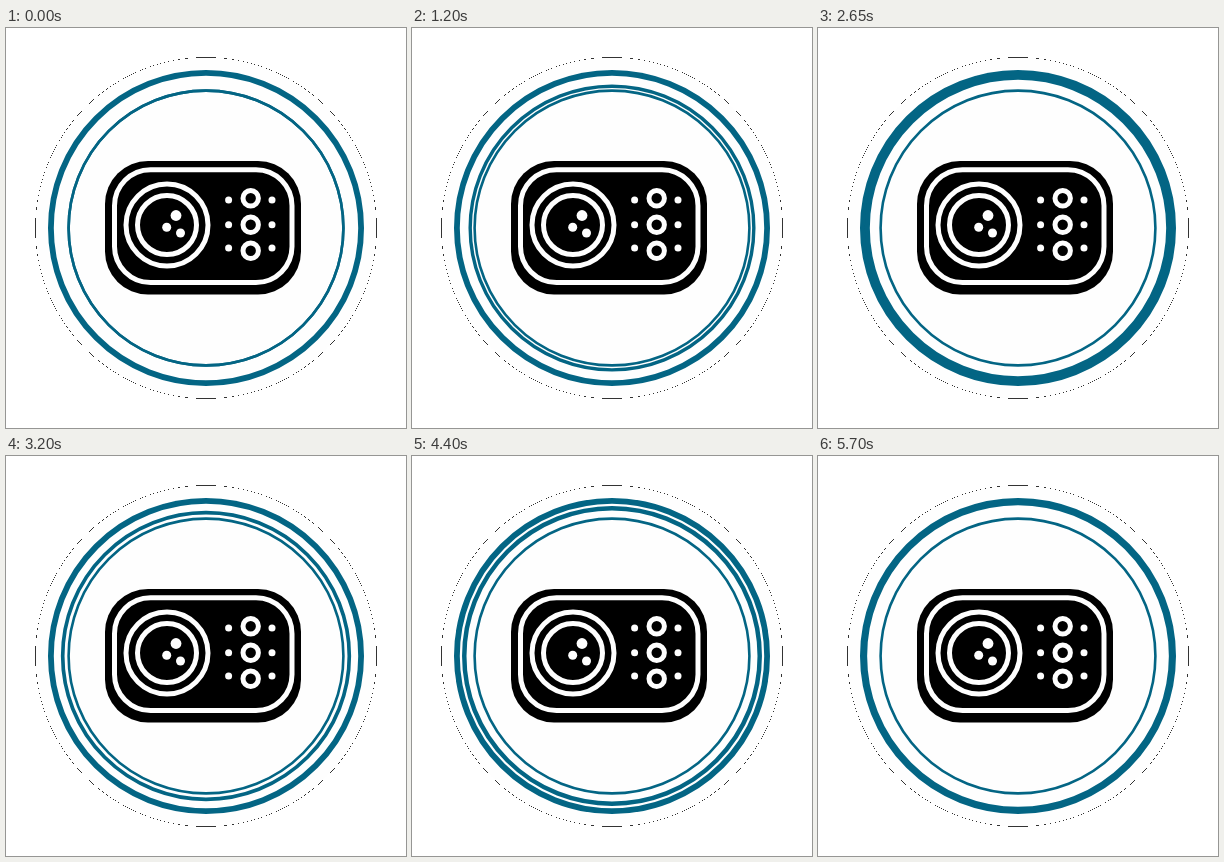
An HTML page that plays this animation: 400 px wide and 400 px high, repeating every 5.75 s.

```html
<!DOCTYPE html>
<html lang="en">
<head>
<meta charset="utf-8">
<title>Projector badge</title>
<style>
  html, body { margin: 0; width: 100%; height: 100%; overflow: hidden; background: #fff; }
  svg { display: block; width: 100vw; height: 100vh; }
  .teal { fill: none; stroke: #036584; }
  .line { fill: none; stroke: #fefefe; stroke-width: 5; }
  .dot { fill: #fefefe; }
</style>
</head>
<body>
<svg viewBox="0 0 400 400">
  <circle cx="200" cy="200" r="170.5" fill="#fefefe"/>
  <path id="rim" fill="#333" shape-rendering="crispEdges"/>

  <circle id="outer" class="teal" cx="200" cy="200"/>
  <circle id="inner" class="teal" cx="200" cy="200"/>
  <circle id="pulse" class="teal" cx="200" cy="200"/>

  <rect x="99" y="133" width="196" height="133.5" rx="43"/>
  <rect class="line" x="108.5" y="141.8" width="177.5" height="112.8" rx="36"/>

  <circle class="line" cx="161" cy="197" r="41"/>
  <circle class="line" cx="161" cy="197" r="29.5"/>
  <circle class="dot" cx="170" cy="187.5" r="5.4"/>
  <circle class="dot" cx="160.7" cy="199.3" r="4.5"/>
  <circle class="dot" cx="174.5" cy="205" r="4.5"/>
  <g id="buttons"></g>
</svg>
<script>
  const LOOP = 5750, STEP = 80, STEPS_PER_PULSE = 12;
  const CENTER = 200;
  const OUTER = { far: 158, near: 152.2 };
  const INNER = { far: 138.7, near: 136.1 };
  const byId = id => document.getElementById(id);
  const mix = (a, b, p) => a + (b - a) * p;

  function setRing(el, far, near) {
    el.setAttribute('r', (far + near) / 2);
    el.setAttribute('stroke-width', far - near);
  }

  // Broken one-pixel edge of the disc
  function rimPath() {
    let d = '';
    for (let y = 28; y < 372; y++) {
      for (let x = 28; x < 372; x++) {
        const dist = Math.hypot(x + 0.5 - CENTER, y + 0.5 - CENTER);
        if (dist >= 170.5 && dist < 170.8) d += `M${x} ${y}h1v1h-1z`;
      }
    }
    return d;
  }

  function buttonRow([ringY, dotY]) {
    const dot = x => `<circle class="dot" cx="${x}" cy="${dotY}" r="3.5"/>`;
    return dot(222.6) + dot(266) +
      `<circle class="line" cx="244.7" cy="${ringY}" r="7.7"/>`;
  }

  byId('rim').setAttribute('d', rimPath());
  byId('buttons').innerHTML = [[170.3, 172], [196.7, 196.7], [222.7, 220]].map(buttonRow).join('');
  setRing(byId('outer'), OUTER.far, OUTER.near);
  setRing(byId('inner'), INNER.far, INNER.near);

  const pulse = byId('pulse');
  function render(ms) {
    const step = Math.floor((ms % LOOP) / STEP);
    const p = (step % STEPS_PER_PULSE) / STEPS_PER_PULSE;
    setRing(pulse, mix(INNER.far, OUTER.far, p), mix(INNER.near, OUTER.near, p));
  }

  const start = performance.now();
  function tick() {
    render(performance.now() - start);
    requestAnimationFrame(tick);
  }
  tick();
</script>
</body>
</html>
```
